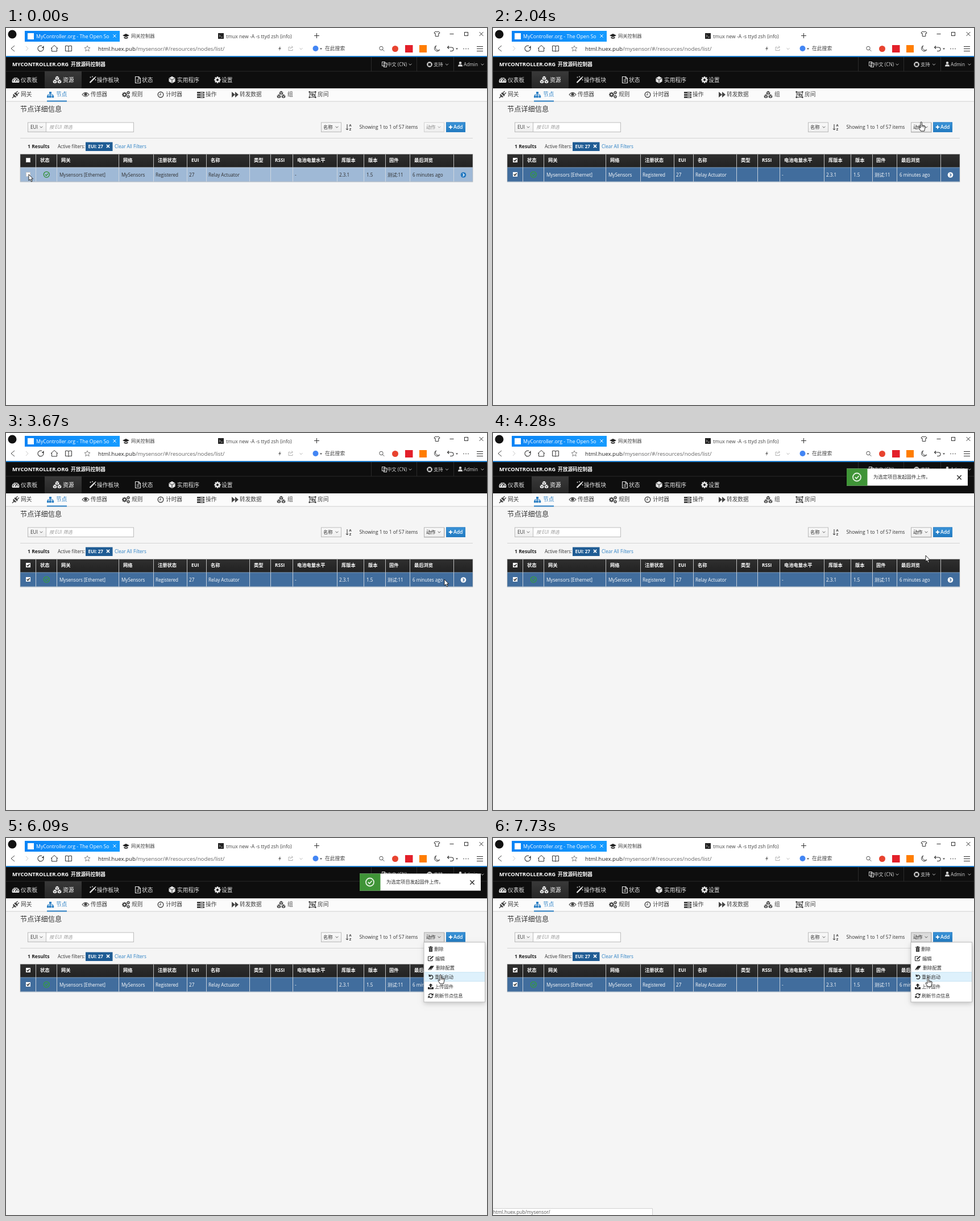
These frames come from a looping animation (846 px wide and 662 px high, 8 s). An HTML page with a canvas:

```html
<!DOCTYPE html>
<html lang="zh-CN">
<head>
<meta charset="utf-8">
<title>节点详细信息</title>
<style>
html, body { margin: 0; width: 100%; height: 100%; overflow: hidden; background: #f5f5f5; }
canvas { display: block; }
</style>
</head>
<body>
<canvas id="stage" width="846" height="662"></canvas>
<script>
const g = document.getElementById('stage').getContext('2d');
const LOOP = 8000;
const FONT = '"Open Sans", "Noto Sans CJK SC", "Noto Sans CJK", sans-serif';
const INK = '#333', BLUE = '#2a7fc4';

function rect(x, y, w, h, fill) {
  g.fillStyle = fill;
  g.fillRect(x, y, w, h);
}
function shade(x, y, w, h, top, bottom) {
  const grad = g.createLinearGradient(0, y, 0, y + h);
  grad.addColorStop(0, top);
  grad.addColorStop(1, bottom);
  rect(x, y, w, h, grad);
}
function frame(x, y, w, h, color, lw = 1) {
  g.strokeStyle = color;
  g.lineWidth = lw;
  g.strokeRect(x + .5, y + .5, w - 1, h - 1);
}
function disc(x, y, r, fill) {
  g.fillStyle = fill;
  g.beginPath();
  g.arc(x, y, r, 0, 7);
  g.fill();
}
function arc(x, y, r, color, lw = 1, from = 0, to = 6.2832) {
  g.strokeStyle = color;
  g.lineWidth = lw;
  g.beginPath();
  g.arc(x, y, r, from, to);
  g.stroke();
}
function path(d, x, y, fill, stroke, lw = 1) {
  const p = new Path2D(d);
  g.save();
  g.translate(x, y);
  if (fill) { g.fillStyle = fill; g.fill(p); }
  if (stroke) { g.strokeStyle = stroke; g.lineWidth = lw; g.stroke(p); }
  g.restore();
}
const line = (d, x, y, color, lw = 1) => path(d, x, y, null, color, lw);

// y is the middle of the capitals
function text(str, x, y, size = 8.2, color = INK, style = '') {
  g.font = `${style} ${size}px ${FONT}`;
  g.fillStyle = color;
  g.fillText(str, x, y + size * .36);
}
const chevron = (x, y, color = INK) => line('M-2.4-1.2L0 1.2 2.4-1.2', x, y, color, .9);
const cross = (x, y, r, color, lw) => line(`M${-r} ${-r}L${r} ${r}M${r} ${-r}L${-r} ${r}`, x, y, color, lw);
const caret = (x, y) => path('M-2-1H2L0 1.4z', x, y, '#444');

function cube(x, y, r, color, gap) {
  const w = r * .9, h = r / 2;
  path(`M0 ${-r}L${w} ${-h}V${h}L0 ${r} ${-w} ${h}V${-h}z`, x, y, color);
  line(`M${-w} ${-h}L0 0 ${w} ${-h}M0 0V${r}`, x, y, gap, .8);
}
function cubes(x, y, color, gap) {
  cube(x, y - 3, 3.6, color, gap);
  cube(x - 4, y + 3, 3.6, color, gap);
  cube(x + 4, y + 3, 3.6, color, gap);
}
function cog(x, y, r, color, hole) {
  g.save();
  g.translate(x, y);
  for (let i = 0; i < 8; i++) {
    rect(-r * .22, -r, r * .44, r, color);
    g.rotate(Math.PI / 4);
  }
  g.restore();
  disc(x, y, r * .76, color);
  disc(x, y, r * .34, hole);
}
function turn(x, y, r, color, lw) {
  arc(x, y, r, color, lw, -2.4, 2.4);
  path('M0 0V-4.5L4.5 0z', x - r - .6, y - r * .25, color);
}
function tick(x, y, r, color, lw) {
  arc(x, y, r, color, lw);
  const s = r / 5;
  line(`M${-2.3 * s} 0L${-.5 * s} ${1.8 * s} ${2.5 * s} ${-1.6 * s}`, x, y, color, lw);
}

function browserBar() {
  rect(0, 0, 846, 50, '#fff');
  disc(11, 11, 7.5, '#111');
  const tab = g.createLinearGradient(33, 0, 200, 0);
  tab.addColorStop(0, '#0a84f5');
  tab.addColorStop(1, '#159bff');
  rect(33, 5, 167, 19, tab);
  rect(38, 9, 11, 11, '#fff');
  text('MyController.org - The Open So', 53, 14.5, 8.75, '#fff');
  cross(191, 14, 2.6, '#fff', 1);
  path('M-6-1L0-4 6-1 0 2zM-3.5 1.5L0 3.2 3.5 1.5V3.7Q0 6-3.5 3.7z', 211, 14, '#222');
  text('网关控制器', 220, 14.5, 8.3, '#444');
  rect(373, 9, 10, 10, '#222');
  line('M-3-2L-1 0-3 2M0 2H3', 378, 14, '#ddd', .8);
  text('tmux new -A -s ttyd zsh (info)', 387, 14.5, 8.6, '#444');
  line('M-4.5 0H4.5M0-4.5V4.5', 546.5, 13.5, '#333');
  line('M-2-4L-5-2-4 0-2.8-.5V4.5H2.8V-.5L4 0 5-2 2-4Q0-2-2-4z', 758, 10, '#333');
  line('M-3.5 .5H3.5', 784, 10, '#333');
  frame(806, 7, 7, 7, '#333');
  cross(836, 10.5, 3.4, '#333', 1);

  line('M3-5L-3 0 3 5', 12, 36, '#444');
  line('M-2-4L2 0-2 4', 37, 36, '#ccc');
  arc(61, 36, 5, '#333', 1.1, -.4, 5.1);
  path('M0-3V1H-4z', 66.5, 34, '#333');
  line('M-6 0L0-5.5 6 0M-4.5-1V5H4.5V-1', 85, 36, '#333');
  line('M0-4Q-3-5.5-5.5-4.5V4.5Q-2 4 0 5.2 2 4 5.5 4.5V-4.5Q3-5.5 0-4V5', 110, 36, '#333');
  line('M0-5L1.5-1.7 5-1.4 2.3 1 3.2 4.6 0 2.7-3.2 4.6-2.3 1-5-1.4-1.5-1.7z', 143, 36, '#777', .9);
  text('html.huex.pub', 162, 36.5, 9.68, '#222');
  text('/mysensor/#/resources/nodes/list/', 228, 36.5, 9.68, '#666');
  path('M1-4.5L-2.5 1H-.3L-1 4.5 2.5-1.2H.3z', 481.5, 36, '#777');
  line('M-1-2.5H-4V3.5H3V1M-1.5 1Q-1-2.5 3-2.5M1.2-4.5L3.4-2.5 1.2-.5', 501, 36, '#aaa', .9);
  chevron(519, 36.5, '#aaa');
  disc(544.5, 36, 5, '#4285f4');
  caret(554, 36.5);
  text('在此搜索', 561, 36, 8.8, '#444');
  arc(660, 35.5, 3.2, '#555');
  line('M0 0L3 3', 662.3, 37.8, '#555');
  disc(684.5, 36.5, 5.5, '#e8432f');
  rect(702, 30, 13.5, 13, '#e3202a');
  rect(727, 30, 13, 13, '#ff7d00');
  line('M-1-5A5 5 0 1 0 5 2 4.5 4.5 0 0 1-1-5z', 758, 36, '#333');
  line('M-3-4.5L-5.5-2-3 .5M-5.5-2H1.5Q5-1.8 5 1.3 5 4.5 1.5 4.5H-1', 782, 36, '#333', 1.1);
  caret(793, 36.5);
  for (const x of [805, 809, 813]) disc(x, 36.5, .8, '#333');
  line('M-5.5-3.5H5.5M-5.5 .5H5.5M-5.5 4.5H5.5', 833.5, 36, '#333');
}

function siteNav() {
  rect(0, 49, 846, 2.4, '#1f7fd0');
  rect(0, 51, 846, 55, '#0e0e0e');
  rect(0, 75.5, 846, 1, '#292929');
  for (const x of [642, 722, 787]) rect(x, 51, 1, 25, '#2b2b2b');
  text('MYCONTROLLER.ORG', 11, 63.5, 9.38, '#fff', 'bold');
  text('开放源码控制器', 114, 63.5, 8.7, '#fff', 'bold');
  const pale = '#d5d5d5';
  frame(661, 59, 6, 8, pale);
  frame(664, 61, 6, 8, pale);
  text('中文 (CN)', 670, 64, 8.3, pale);
  chevron(711, 64, pale);
  arc(745, 64, 3.7, pale, 2.2);
  cross(745, 64, 3.4, '#0e0e0e', .7);
  text('支持', 752, 64, 8.4, pale);
  chevron(775.5, 64, pale);
  disc(799, 61.3, 2.2, pale);
  path('M-4 3.5Q-4 0-1.5 0H1.5Q4 0 4 3.5z', 799, 64, pale);
  text('Admin', 805, 64, 8.2, pale);
  chevron(838, 64, pale);

  shade(68, 76, 65, 30, '#393939', '#272727');
  const w = '#e4e4e4';
  path('M-6 4.5A6.5 6.5 0 1 1 6 4.5z', 17, 91.5, w);
  for (let i = 0; i < 5; i++) {
    const a = Math.PI * (1 + i / 4);
    disc(17 + 4 * Math.cos(a), 92.5 + 4 * Math.sin(a), .9, '#0e0e0e');
  }
  line('M-.3 2L1.5-2.5', 17, 92, '#0e0e0e', 1.3);
  cubes(90, 91, '#fff', '#303030');
  line('M-5 5L4-4', 152.5, 91, w, 2.4);
  for (const [x, y] of [[148.5, 86.5], [152, 85.5], [157.5, 91], [157.5, 86]]) disc(x, y, .9, w);
  line('M-4.5-5.5H1.5L4.5-2.5V5.5H-4.5zM1-5.5V-2H4.5M-2.3 0H2.3M-2.3 2.5H2.3', 232, 91, w, 1.1);
  cube(292, 91, 6.2, w, '#0e0e0e');
  cog(372, 91, 5.8, w, '#0e0e0e');
  const main = [['仪表板', 26], ['资源', 100], ['操作板块', 160], ['状态', 239], ['实用程序', 301], ['设置', 379]];
  for (const [s, x] of main) text(s, x, 91, 9.75, x === 100 ? '#fff' : w);
}

function subNav() {
  rect(0, 106, 846, 23, '#fbfbfb');
  rect(0, 128.4, 846, 1, '#d1d1d1');
  const c = '#444';
  line('M-6 6L-2.5 2.5', 17, 117, c, 1.5);
  path('M-4-1.5L1.5 4Q-1.5 5.5-3.5 3.5T-4-1.5zM-3-2.5L0-4 4 0 2.5 3z', 17, 117, c);
  line('M1-3.5L3.5-6M3.5-1L6-3.5', 17, 117, c, 1.4);
  line('M0-2V2M-4.5 3V0H4.5V3', 78, 117, BLUE);
  rect(76, 112, 4, 3.6, BLUE);
  for (const x of [72, 76, 80.5]) rect(x, 118.7, 3.7, 3.7, BLUE);
  line('M-6 0Q0-7.5 6 0 0 7 -6 0z', 140, 117, c, 1.1);
  disc(140, 116.5, 2.6, c);
  cog(208.5, 117, 4.4, c, '#fbfbfb');
  cog(215.2, 113.6, 2.9, c, '#fbfbfb');
  cog(215.2, 120.6, 2.9, c, '#fbfbfb');
  arc(272, 117, 4.8, c, 1.4);
  line('M0-3V.5H-2.5', 272, 117, c);
  for (const y of [112, 116, 120]) {
    rect(336, y, 13, 3, c);
    rect(342, y + 1, 5, 1, '#fbfbfb');
  }
  path('M-6-5L0 0-6 5zM0-5L6 0 0 5z', 403, 117, c);
  cubes(484, 117, c, '#fbfbfb');
  frame(533.5, 112, 11, 10, c);
  for (const x of [532.5, 543]) for (const y of [111, 120.5]) rect(x, y, 2.5, 2.5, c);
  frame(535.5, 114, 5, 4, c);
  frame(538, 116, 5, 4, c);
  const items = [['网关', 26], ['节点', 88], ['传感器', 149], ['规则', 221], ['计时器', 281],
    ['操作', 351], ['转发数据', 411], ['组', 495], ['房间', 548]];
  for (const [s, x] of items) text(s, x, 117, 9.7, x === 88 ? BLUE : c);
  rect(72, 127.4, 35, 2, BLUE);
}

function button(x, w, top, bottom, border) {
  shade(x, 165.5, w, 17.5, top, bottom);
  frame(x, 165.5, w, 17.5, border);
}

function toolbar(enabled, open) {
  text('节点详细信息', 25, 142.5, 12.2, '#333');
  button(38, 33, '#fafafa', '#ededed', '#bbb');
  text('EUI', 43, 174, 8.3);
  chevron(62, 174, '#555');
  rect(71, 165.5, 154, 17.5, '#fff');
  frame(70, 165.5, 155, 17.5, '#bbb');
  text('按 EUI 筛选', 76, 174, 8.2, '#999', 'italic');
  button(554, 36, '#fafafa', '#ededed', '#bbb');
  text('名称', 558, 174, 8.4);
  chevron(582, 174, '#555');
  line('M0-5V5M-2 2.7L0 5 2 2.7', 600, 174, INK);
  text('A', 603.5, 171.3, 6, INK, 'bold');
  text('Z', 603.7, 177.5, 6, INK, 'bold');
  text('Showing 1 to 1 of 57 items', 621.5, 174, 8.4);
  if (enabled) rect(735, 166, 37, 18, '#d2d2d2');
  button(735, 36, open ? '#d9d9d9' : '#fafafa', open ? '#e3e3e3' : '#ededed', enabled ? '#b3b3b3' : '#d1d1d1');
  text('动作', 739, 174, 8.4, enabled ? '#222' : '#888');
  chevron(762, 174, enabled ? '#444' : '#999');
  button(774, 34, '#3b94d9', '#2179bf', '#2a7fc4');
  line('M-3.2 0H3.2M0-3.2V3.2', 782, 174, '#fff', 1.8);
  text('Add', 787, 174, 8.6, '#fff', '600');
  rect(25, 193, 796, 1, '#d4d4d4');

  text('1 Results', 38, 208, 8.6, '#222', 'bold');
  text('Active filters:', 91, 208, 8.07);
  rect(140, 200.5, 47.5, 15.5, '#1f5c94');
  text('EUI: 27', 144.5, 208, 7.9, '#fff', 'bold');
  cross(179.5, 207.5, 2.6, '#fff', 1.5);
  text('Clear All Filters', 191, 208, 8.1, BLUE);
}

function checkbox(x, y, on) {
  rect(x, y, 8, 8, '#fff');
  if (on) line('M-2.3 0L-.6 1.9 2.6-2', x + 4, y + 4, '#222', 1.5);
  else frame(x, y, 8, 8, '#ccc');
}

function table(selected) {
  shade(25, 221.5, 796, 23.5, '#2f2f2f', '#222');
  rect(25, 245, 796, 25, selected ? '#416d9d' : '#9fb9d6');
  rect(25, 244.5, 796, 1, selected ? '#7f9dbd' : '#c0cedd');
  rect(25, 269.5, 796, 1, selected ? '#8fb0d0' : '#b5c7da');
  for (const x of [52, 89, 198, 259, 318, 352, 428, 465, 504, 582, 629, 667, 710, 787]) {
    rect(x, 222, 1, 23, '#bdbdbd');
    rect(x, 245, 1, 25, selected ? '#c3cedb' : '#cdd6e0');
  }
  frame(24.5, 221, 797, 49.5, 'rgba(180,180,180,.6)');
  checkbox(35, 228, selected);
  const heads = [['状态', 60], ['网关', 97], ['网络', 206], ['注册状态', 267], ['EUI', 326], ['名称', 360], ['类型', 436],
    ['RSSI', 473], ['电池电量水平', 512], ['库版本', 590], ['版本', 637], ['固件', 674], ['最后浏览', 718]];
  for (const [s, x] of heads) text(s, x, 232.5, 8.25, '#fff', 'bold');
  const cells = [['Mysensors [Ethernet]', 94], ['MySensors', 203], ['Registered', 263], ['27', 322], ['Relay Actuator', 356],
    ['-', 508], ['2.3.1', 586], ['1.5', 634], ['测试:11', 671], ['6 minutes ago', 715]];
  const weight = selected ? '500' : '';
  for (const [s, x] of cells) text(s, x, 257.8, 8.15, selected ? '#fff' : '#2d2d2d', weight);
  checkbox(35, 253, selected);
  tick(71.3, 257.3, 5, selected ? '#36a03a' : '#2f8f2f', 1.3);
  disc(804.5, 258, 4.8, selected ? '#fff' : '#2378c0');
  line('M-1-2.4L1.4 0-1 2.4', 804.5, 258, selected ? '#416d9d' : '#fff', 1.4);
}

const MENU = [['删除', 753], ['编辑', 755], ['删除配置', 756], ['重新启动', 754], ['上传固件', 754], ['刷新节点信息', 754]];
const ROW = 16.35;

function menuIcon(i, x, y) {
  const c = '#222';
  if (i === 0) {
    rect(x - 3, y - 2, 6, 6.5, c);
    rect(x - 4, y - 3.8, 8, 1.2, c);
    frame(x - 1.5, y - 5, 3, 2, c);
    line('M-1-1V3.5M1-1V3.5', x, y, '#fff', .6);
  } else if (i === 1) {
    line('M1-3.5H-4.5V4H3V1', x, y, c, 1);
    line('M-1.5 1.5L4.5-4', x, y, c, 1.8);
  } else if (i === 2) {
    path('M-5.5 3.5L-.5-3.5H5.5L.5 3.5z', x + .5, y, c);
    line('M-3.8 2.6H-.3L1.4 .3', x + .5, y, '#fff', .6);
  } else if (i === 3) {
    turn(x + .5, y, 3.3, c, 1.4);
  } else if (i === 4) {
    path('M0-5L3.5-1.5H1.2V2H-1.2V-1.5H-3.5zM-5 1.5H-2V3H2V1.5H5V4.8H-5z', x, y, c);
  } else {
    arc(x, y, 3.5, c, 1.4, -2.9, -.5);
    arc(x, y, 3.5, c, 1.4, .25, 2.65);
    path('M4.7-4.5V-.5H.7zM-4.7 4.5V.5H-.7z', x, y, c);
  }
}

function menu(tipY) {
  g.save();
  g.shadowColor = 'rgba(0,0,0,.2)';
  g.shadowBlur = 8;
  g.shadowOffsetY = 3;
  rect(735, 183, 108, 105, '#fff');
  g.restore();
  frame(734.5, 182.5, 108.5, 106, '#bbb');
  const hot = Math.floor((tipY - 187) / ROW);
  MENU.forEach(([label, x], i) => {
    const y = 187 + i * ROW;
    if (i === hot) {
      rect(736, Math.round(y) - .5, 106, ROW, '#def1fc');
      rect(736, Math.round(y) - .5, 106, .8, '#bfe0f2');
      rect(736, Math.round(y) + ROW - 1, 106, .8, '#bfe0f2');
    }
    menuIcon(i, 747, y + 8.2);
    text(label, x, y + 8.2, 8.25, '#333');
  });
}

function toast() {
  g.save();
  g.shadowColor = 'rgba(0,0,0,.25)';
  g.shadowBlur = 5;
  g.shadowOffsetY = 2;
  rect(622, 62.5, 213, 30, '#fff');
  g.restore();
  rect(622, 62.5, 36.5, 30, '#3f9437');
  tick(640, 77.5, 7, '#e4f2e2', 1.8);
  text('为选定项目发起固件上传。', 669, 77, 8.4, '#333');
  cross(820, 78, 3.7, '#333', 1.5);
}

function statusBar() {
  rect(0, 650, 281, 12, '#fff');
  line('M0 .5H280.5V12', 0, 650, '#d0d0d0');
  text('html.huex.pub/mysensor/', 0, 657.5, 8.3, '#555');
}

function sideToggle() {
  rect(3, 642, 18, 18, '#fcfcfc');
  line('M-3.5-5V5M-.5-4.5L4.5 0-.5 4.5', 13, 650.5, '#444');
}

// time, tip x, tip y, hand?
const MOVES = [
  [0, 40, 257, 0], [1020, 41, 256, 0], [1240, 53, 253, 1], [1440, 260, 222, 0], [1640, 560, 178, 0],
  [1840, 755, 151, 0], [2040, 753, 165, 1], [2260, 752, 166, 1], [2460, 757, 190, 1], [2660, 766, 232, 1],
  [2860, 771, 257, 1], [3670, 771, 257, 0], [3870, 770, 251, 0], [4080, 766, 235, 0], [4280, 761, 215, 0],
  [4480, 755, 180, 1], [4670, 752, 165, 1], [5090, 752, 166, 1], [5290, 752, 169, 1], [5490, 752, 174, 1],
  [5690, 753, 179, 1], [5890, 758, 208, 1], [6090, 764, 240, 1], [6310, 767, 255, 1], [6510, 767, 253, 1],
  [6710, 765, 246, 1], [7110, 765, 247, 1], [7730, 765, 245, 1]
];
const HAND = 'M-1 1.2a1.2 1.2 0 0 1 2.4 0V5.6L6 6.8q1.5.5 1.3 2L6.4 12.5 5.6 16H-.6L-3.6 11.2q-1.1-2 .4-2.3L-1 10.5z';
const ARROW = 'M0 0V10.8L2.5 8.6 4.4 12.8 6.2 12 4.3 8H7.6z';

function pointer([, x, y, hand]) {
  path(hand ? HAND : ARROW, x, y, '#fff', '#111', .9);
  if (hand) line('M1.4 5.6V9M3.4 6.5V9.3M5.3 7V9.5', x, y, '#111', .7);
}

function draw(t) {
  const during = (from, to) => t >= from && t < to;
  const move = MOVES.findLast(m => m[0] <= t);
  const selected = t >= 1020;
  const open = during(2260, 3670) || t >= 5090;
  rect(0, 0, 846, 662, '#f5f5f5');
  browserBar();
  siteNav();
  subNav();
  toolbar(selected, open);
  table(selected);
  if (open) menu(move[2]);
  if (during(3870, 6310)) toast();
  if (during(2460, 3670) || t >= 6310) statusBar();
  if (during(1020, 1640)) sideToggle();
  pointer(move);
}

const start = performance.now();
function tickFrame() {
  draw((performance.now() - start) % LOOP);
  requestAnimationFrame(tickFrame);
}
tickFrame();
</script>
</body>
</html>
```
